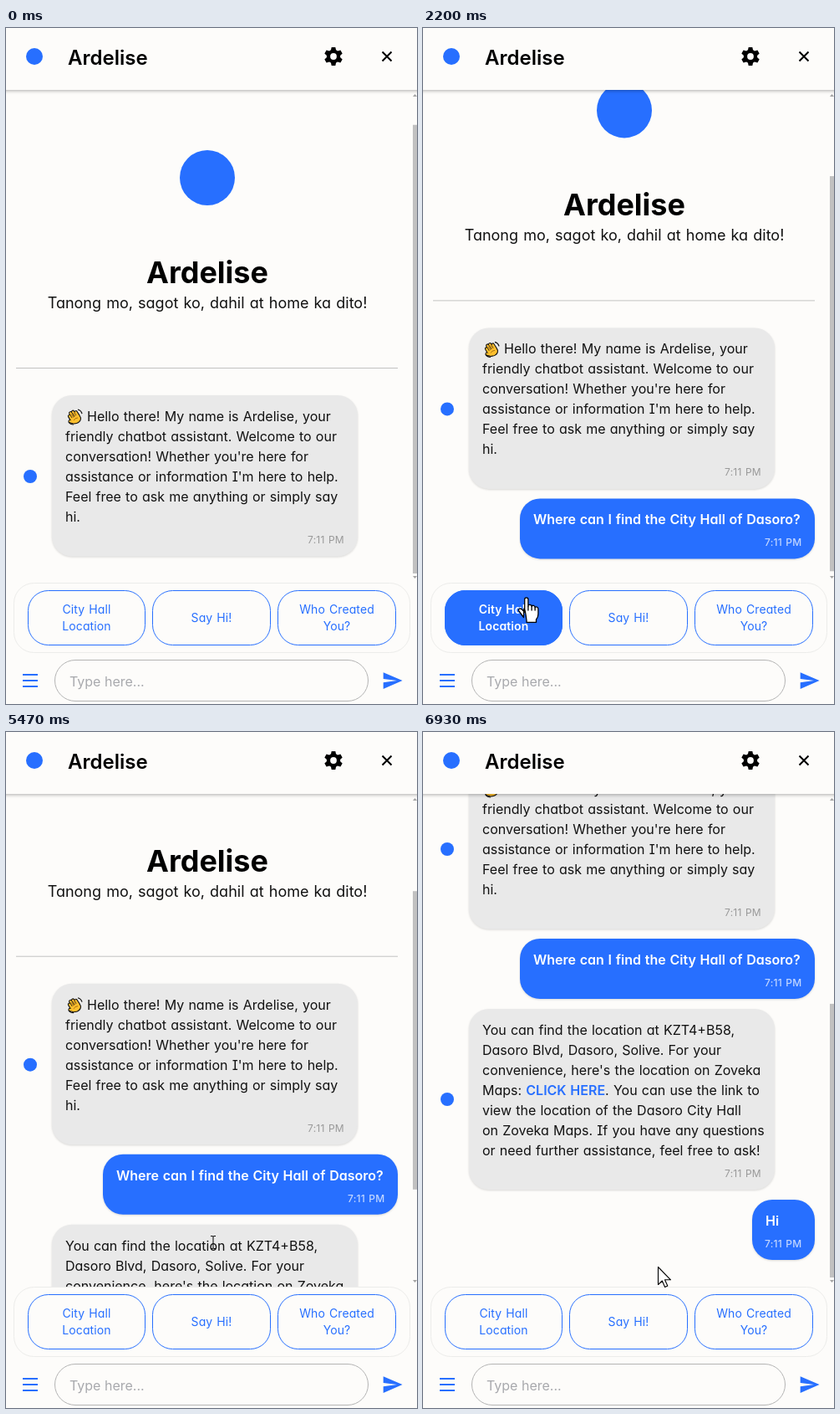
Write an HTML page that moves like this. It is 492 px wide and 808 px high and loops after 8 s.

```html
<!DOCTYPE html>
<html lang="en">
<head>
<meta charset="utf-8">
<title>Chat</title>
<style>
  html, body { margin: 0; width: 100%; height: 100%; overflow: hidden; background: #fdfcfa; }
  svg { display: block; }
  text { font: 400 16px Inter, Lato, sans-serif; font-feature-settings: "cv11"; font-optical-sizing: none;
         word-spacing: .7px; fill: #111; }
  .body { font-feature-settings: "cv11", "cv08"; }
  .strong { font-weight: 600; fill: #fff; }
  .link { font-weight: 600; fill: #276fff; font-feature-settings: normal; }
  .time { font-size: 12px; letter-spacing: .25px; fill: #999; }
  .time.out { font-weight: 500; fill: #c3d7ff; }
  .name { font-size: 24px; font-weight: 600; fill: #000; }
  .title { font-size: 36px; font-weight: 700; fill: #000; text-anchor: middle; }
  .tag { font-size: 18px; word-spacing: 1.1px; text-anchor: middle; }
  .pill { font-size: 14px; letter-spacing: .1px; word-spacing: 1px; text-anchor: middle; }
  .hint { fill: #a8a9ad; word-spacing: 0; }
  .bubble { filter: drop-shadow(0 1px 1px rgba(0, 0, 0, .14)); }
  .head { filter: drop-shadow(0 1px 2px rgba(0, 0, 0, .32)); }
</style>
</head>
<body>
<svg id="stage" width="492" height="808" viewBox="0 0 492 808"></svg>
<script>
const BLUE = '#276fff', BG = '#fdfcfa';
const FPS = 15, LOOP = 8000;
const BOT = 'Ardelise', TOWN = 'Dasoro', MAPS = 'Zoveka';

// Steps at which things happen
const SENT = 29, TYPING = 56, REPLY = 81, HI = 97, SCROLL_STEPS = 5;

const text = (x, y, cls, s) => `<text x="${x}" y="${y}" class="${cls}">${s}</text>`;
const lines = (x, y, list) => list.map((s, i) => text(x, y + 24 * i, 'body', s)).join('');
const dot = (x, y, r, fill = BLUE) => `<circle cx="${x}" cy="${y}" r="${r}" fill="${fill}"/>`;
const box = (x, y, w, h, r, attrs) =>
  `<rect x="${x}" y="${y}" width="${w}" height="${h}" rx="${r}" ${attrs}/>`;
const bubble = (x, y, w, h, fill) => box(x, y, w, h, 24, `class="bubble" fill="${fill}"`);

function wave() {
  const fingers = 'M-4.5 1V-4M-1.5 0V-6.5M1.6 0V-6.2M4.4 1V-4M-4 5L-7.3 1.5';
  const palm = 'M-4 1H4V4Q3 6 0 6Q-3 6-4 3Z';
  const layer = (color, w, pw) =>
    `<g stroke="${color}" fill="${color}" stroke-linecap="round" stroke-linejoin="round">
      <path d="${fingers}" stroke-width="${w}" fill="none"/><path d="${palm}" stroke-width="${pw}"/></g>`;
  return `<g transform="translate(82 465) rotate(-32)">${layer('#111', 4.4, 5)}${layer('#ffc02e', 2.3, 2.8)}
    <path d="M-1.4 0V-5M1.6 0V-5M-3 3Q0 1 3 3" fill="none" stroke="#7a4a05" stroke-width=".6"/></g>
    <path d="M86 456q4 1 5 5M75 471q2 3 6 3" fill="none" stroke="#111" stroke-width="1.2"/>`;
}

function gear() {
  let s = dot(0, 0, 8.2, '#000');
  for (let a = 0; a < 360; a += 60)
    s += `<path d="M-3.4-6L-2.3-11H2.3L3.4-6Z" transform="rotate(${a})"/>`;
  return `<g transform="translate(392 34)">${s}${dot(0, 0, 3.9, BG)}</g>`;
}

const pills = [
  { x: 26.5, w: 140, rows: ['City Hall', 'Location'] },
  { x: 175.5, w: 141, rows: ['Say Hi!'] },
  { x: 325.5, w: 141, rows: ['Who Created', 'You?'] }
];

function pill({ x, w, rows }) {
  const y = rows.length > 1 ? 700 : 710;
  const label = attrs => `<g ${attrs}>` + rows.map((s, i) =>
    `<text x="${x + w / 2}" y="${y + 20 * i}" class="pill" style="fill:inherit;font-weight:inherit">${s}</text>`).join('') + '</g>';
  return box(x, 672.5, w, 65, 24, `fill="${BG}" stroke="${BLUE}"`) + label(`fill="${BLUE}"`) +
    `<g class="hover">${box(x, 672.5, w, 65, 24, `fill="${BLUE}" stroke="${BLUE}"`)}${label('fill="#fff" font-weight="600"')}</g>`;
}

const reply = [
  'You can find the location at KZT4+B58,',
  `${TOWN} Blvd, ${TOWN}, Solive. For your`,
  `convenience, here's the location on ${MAPS}`,
  'Maps: <tspan class="link">CLICK HERE</tspan>. You can use the link to',
  `view the location of the ${TOWN} City Hall`,
  `on ${MAPS} Maps. If you have any questions`,
  'or need further assistance, feel free to ask!'
];

const greeting = [
  'friendly chatbot assistant. Welcome to our',
  "conversation! Whether you're here for",
  "assistance or information I'm here to help.",
  'Feel free to ask me anything or simply say',
  'hi.'
];

const $ = id => document.getElementById(id);

$('stage').innerHTML = `
<defs><clipPath id="view"><rect y="74" width="492" height="589"/></clipPath></defs>
<rect width="492" height="808" fill="${BG}"/>
<g clip-path="url(#view)">
  <g id="feed">
    ${dot(241, 179, 33)}
    ${text(241, 305, 'title', BOT)}
    ${text(241, 335, 'tag', 'Tanong mo, sagot ko, dahil at home ka dito!')}
    <path d="M12 406.5H469" stroke="#c2c2c2"/>
    ${bubble(55, 439, 366, 192.5, '#e9e9e9')}${dot(29, 536, 8)}${wave()}
    ${text(97, 470, 'body', `Hello there! My name is ${BOT}, your`)}
    ${lines(71, 494, greeting)}
    ${text(361, 616, 'time', '7:11 PM')}
    <g id="sent">
      ${bubble(116, 643, 353, 72, BLUE)}
      ${text(132, 674, 'strong', `Where can I find the City Hall of ${TOWN}?`)}
      ${text(409, 700, 'time out', '7:11 PM')}
    </g>
    <g id="typing">${dot(29, 744, 8)}${[67, 79, 91].map(x => dot(x, 743, 4, '#c2c2c2')).join('')}</g>
    <g id="reply">
      ${bubble(55, 727, 366, 216, '#e9e9e9')}${dot(29, 835, 8)}
      ${lines(71, 758, reply)}
      ${text(361, 928, 'time', '7:11 PM')}
    </g>
    <g id="hi">
      ${bubble(394, 955, 75, 72, BLUE)}
      ${text(410, 986, 'strong', 'Hi')}
      ${text(409, 1012, 'time out', '7:11 PM')}
    </g>
  </g>
  <rect id="thumb" x="487" width="5" fill="#c1c1c1"/>
  <path d="M487 82L489.5 79L492 82ZM487 655L489.5 658L492 655Z" fill="#a3a3a3"/>
</g>
<rect class="head" x="-8" y="-8" width="508" height="82" fill="${BG}"/>
${dot(34, 34, 10)}
${text(74, 43.5, 'name', BOT)}
${gear()}
<path d="M450.5 28.5L461.5 39.5M461.5 28.5L450.5 39.5" stroke="#000" stroke-width="2"/>
${box(9.5, 663.5, 474, 83, 24, `fill="${BG}" stroke="#ececea"`)}
${pills.map(pill).join('')}
<path d="M20 773H38M20 780H38M20 787H38" stroke="${BLUE}" stroke-width="2"/>
${box(58.5, 755.5, 375, 49, 24.5, `fill="${BG}" stroke="#b4b4b4"`)}
${text(76, 787, 'hint', 'Type here...')}
<path d="M2 21L23 12L2 3V10L17 12L2 14Z" fill="${BLUE}" transform="translate(449.5 767) scale(1.09)"/>
<g id="cursor" stroke="#000" stroke-linejoin="round">
  <path id="arrow" d="M.5.5V21.5L5.3 17L8.6 24.5L11.8 23L8.5 15.8H15.5Z" fill="#fff" stroke-width="1.1"/>
  <path id="beam" d="M-1 -6.5H1.2L2 -5.8L2.8 -6.5H5M2 -6V8M-1 8.5H1.2L2 7.8L2.8 8.5H5" fill="none"/>
  <g id="hand" stroke-width="1.3">
    <path fill="#fff" d="M-1.8 17V1.5Q-1.8-.7.3-.7T2.4 1.5V9.5Q2.4 7.6 4.5 7.8T6.6 10Q7 8.4 8.8 8.8T10.6 11.2Q11.2 10 12.8 10.5T14.4 13V19Q14.4 23 12 25.5V28.8H.5V26.5Q-3-.0-3 23L-8.6 15.5Q-9.8 13.5-8 12.7T-4.5 14Z"/>
    <path fill="none" d="M2.4 9.5V15M6.6 10V15M10.6 11.2V15"/>
  </g>
</g>`;

const path = [
  [14, 482, 796], [17, 395, 748], [20, 250, 728], [24, 107, 713], [31, 107, 713], [35, 140, 650],
  [39, 179, 580], [42, 179, 580], [49, 246, 609], [90, 246, 609], [91, 246, 633], [93, 250, 695],
  [95, 251, 717], [98, 251, 717], [101, 262, 680], [104, 281, 639]
];

function cursorAt(n) {
  const i = path.findIndex(p => p[0] > n);
  if (i === 0) return [-99, -99];
  if (i < 0) return path[path.length - 1].slice(1);
  const [a, ax, ay] = path[i - 1], [b, bx, by] = path[i], u = (n - a) / (b - a);
  return [ax + (bx - ax) * u, ay + (by - ay) * u];
}

const inside = ([x, y], l, t, r, b) => x >= l && x <= r && y >= t && y <= b;
const onPill = (p, { x, w }) => inside(p, x, 672, x + w, 738);
const ease = u => u < .5 ? .5 * (2 * u) ** 2.75 : 1 - .5 * (2 - 2 * u) ** 2.75;
const show = (id, on) => { $(id).style.display = on ? '' : 'none'; };

const stops = [[SENT, 84], [TYPING, 131], [REPLY, 312], [HI, 396]];

function scrollAt(n) {
  let pos = 0, end = 0;
  for (const [start, to] of stops) {
    if (n < start) break;
    pos = end + (to - end) * ease(Math.min(1, (n - start) / SCROLL_STEPS));
    end = to;
  }
  return { pos, end };
}

const hovers = document.querySelectorAll('.hover');
const dots = [...document.querySelectorAll('#typing circle')].slice(1);

function draw(n) {
  const { pos, end } = scrollAt(n);
  $('feed').setAttribute('transform', `translate(0 ${-pos})`);
  show('sent', n >= SENT);
  show('typing', n >= TYPING && n < REPLY);
  show('reply', n >= REPLY);
  show('hi', n >= HI);

  const ratio = 564 / (619.5 + end);
  $('thumb').setAttribute('y', 88 + (30.5 + pos) * ratio);
  $('thumb').setAttribute('height', 589 * ratio);

  const k = (n - TYPING + 140) % 14;
  dots.forEach((d, i) => {
    const u = Math.max(0, Math.min(1, (k + 1 - 3.5 * i) / 6));
    d.setAttribute('cy', 743 - 5 * Math.sin(Math.PI * u));
  });

  const p = cursorAt(n), before = cursorAt(n - 1);
  pills.forEach((b, i) => { hovers[i].style.opacity = (onPill(p, b) + onPill(before, b)) / 2; });

  const q = [p[0], p[1] + pos];
  const inFeed = p[1] < 663 && (inside(q, 71, 452, 400, 596) ||
    n >= SENT && inside(q, 132, 656, 454, 680) || n >= REPLY && inside(q, 71, 740, 405, 908));
  const hand = pills.some(b => onPill(p, b));
  const beam = !hand && (inFeed || inside(p, 70, 756, 424, 804));
  show('hand', hand);
  show('beam', beam);
  show('arrow', !hand && !beam);
  $('cursor').setAttribute('transform', `translate(${p[0]} ${p[1]})`);
}

function tick() {
  draw(Math.floor((performance.now() % LOOP) * FPS / 1000 + .06));
  requestAnimationFrame(tick);
}
tick();
</script>
</body>
</html>
```
